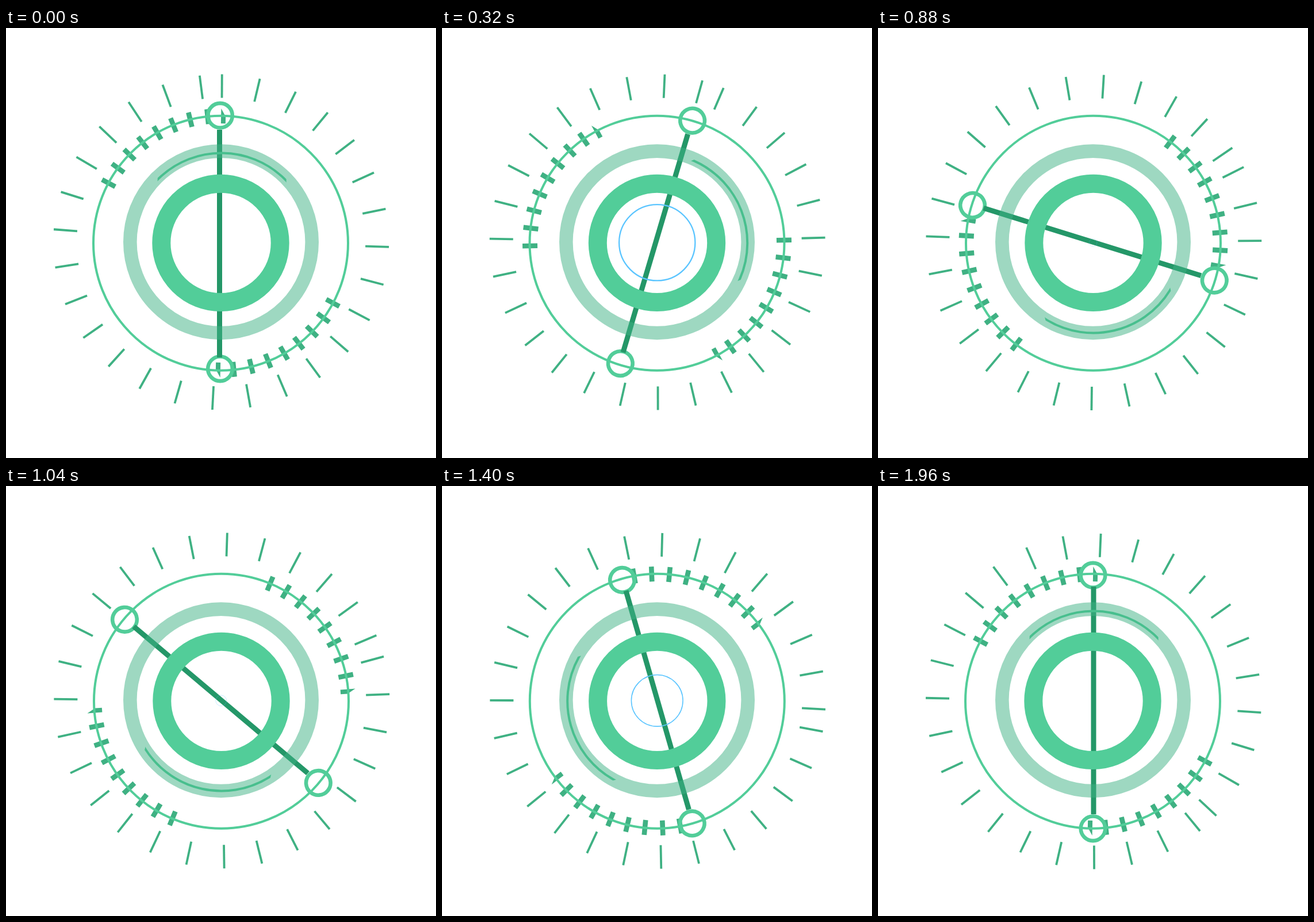
An HTML page that plays this animation: 748x748 px, repeating every 2000 ms.

```html
<!DOCTYPE html>
<html lang="en">
<head>
<meta charset="utf-8">
<title>Rotating dial</title>
<style>
  html, body { margin: 0; width: 100%; height: 100%; overflow: hidden; background: #fff; }
  svg { display: block; width: 100%; height: 100%; }
</style>
</head>
<body>
<svg id="stage" viewBox="0 0 748 748" fill="none">
  <clipPath id="arcClip"><rect x="-112" y="-170" width="224" height="170"/></clipPath>
  <g id="rays" stroke="#3fb183" stroke-width="3.8"></g>
  <g id="notches" stroke="#3fb183" stroke-width="8.6"></g>
  <circle id="orbit" r="221.5" stroke="#52cd99" stroke-width="4"/>
  <g id="needle">
    <circle cy="-220.3" r="21.3" stroke="#52cd99" stroke-width="6.6"/>
    <circle cy="220.3" r="21.3" stroke="#52cd99" stroke-width="6.6"/>
    <path d="M-1-195.5V200.5" stroke="#249768" stroke-width="9"/>
  </g>
  <g id="arc"><circle r="156.5" stroke="#52cd99" stroke-width="4" clip-path="url(#arcClip)"/></g>
  <circle cx="374" cy="372.3" r="158.2" stroke="#3fb183" stroke-opacity=".5" stroke-width="23.6"/>
  <circle id="pulse" cx="374.2" cy="373.3" stroke="#5bc5ff"/>
  <circle id="hub" r="103.2" stroke="#52cd99" stroke-width="32"/>
</svg>
<script>
const LOOP = 2000, STEP = 40, SPAN = LOOP - STEP;
const $ = id => document.getElementById(id);

function add(parent, tag, attrs) {
  const el = document.createElementNS('http://www.w3.org/2000/svg', tag);
  for (const key in attrs) el.setAttribute(key, attrs[key]);
  parent.append(el);
}

function build() {
  for (let i = 0; i < 28; i++)
    add($('rays'), 'path', { d: 'M0-292V-251', transform: `rotate(${i * 13.05})` });
  for (const half of [0, 180]) {
    for (let i = 0; i < 8; i++)
      add($('notches'), 'path', { d: 'M0-234V-208', transform: `rotate(${half - 61.9 + i * 8})` });
    // The last notch is cut off diagonally.
    add($('notches'), 'path', {
      d: 'M-4-234L4-220V-208H-4Z', fill: '#3fb183', stroke: 'none',
      transform: `rotate(${half + 1.2})`
    });
  }
}

const cubic = (a, b, s) => 3 * a * s * (1 - s) ** 2 + 3 * b * s * s * (1 - s) + s ** 3;

function ease(x) {
  let lo = 0, hi = 1;
  for (let i = 0; i < 30; i++) {
    const mid = (lo + hi) / 2;
    if (cubic(.333, .39, mid) < x) lo = mid; else hi = mid;
  }
  return cubic(0, 1, lo);
}

// Time and angle pairs of the highlight arc.
const ARC_KEYS = [[0, 0.5], [320, 68.8], [600, 109.5], [880, 166.7], [1200, 218.2], [1640, 297.3], [1960, 360.5]];

function arcAngle(t) {
  const i = Math.max(1, ARC_KEYS.findIndex(key => key[0] >= t));
  const [t0, a0] = ARC_KEYS[i - 1], [t1, a1] = ARC_KEYS[i];
  return a0 + (a1 - a0) * (t - t0) / (t1 - t0);
}

function place(id, x, y, angle = 0, dx = 0, dy = 0) {
  $(id).setAttribute('transform', `translate(${x} ${y}) rotate(${angle}) translate(${dx} ${dy})`);
}

function draw(t) {
  const p = t / SPAN;
  const sway = 373.5 + Math.sin(Math.PI * p);
  place('rays', 374.2, 373.6, 0.3 + t * 0.0716, 0, -1.2);
  place('notches', sway, 374, -180 * p);
  place('orbit', sway, 374.2);
  place('hub', sway, 373.9);
  place('needle', 373.25, 374, 180 * ease(p), -0.75, -1.5);
  place('arc', 374.7, 374, arcAngle(t));

  const radius = t < 945 ? 100 * (1 - t / 945) : 100 * (t - 945) / (SPAN - 945);
  $('pulse').setAttribute('r', radius);
  $('pulse').setAttribute('stroke-width', radius * 0.035);
}

let start;
function tick(now) {
  start ??= now;
  draw(Math.floor((now - start) % LOOP / STEP) * STEP);
  requestAnimationFrame(tick);
}

build();
draw(0);
requestAnimationFrame(tick);
</script>
</body>
</html>
```
